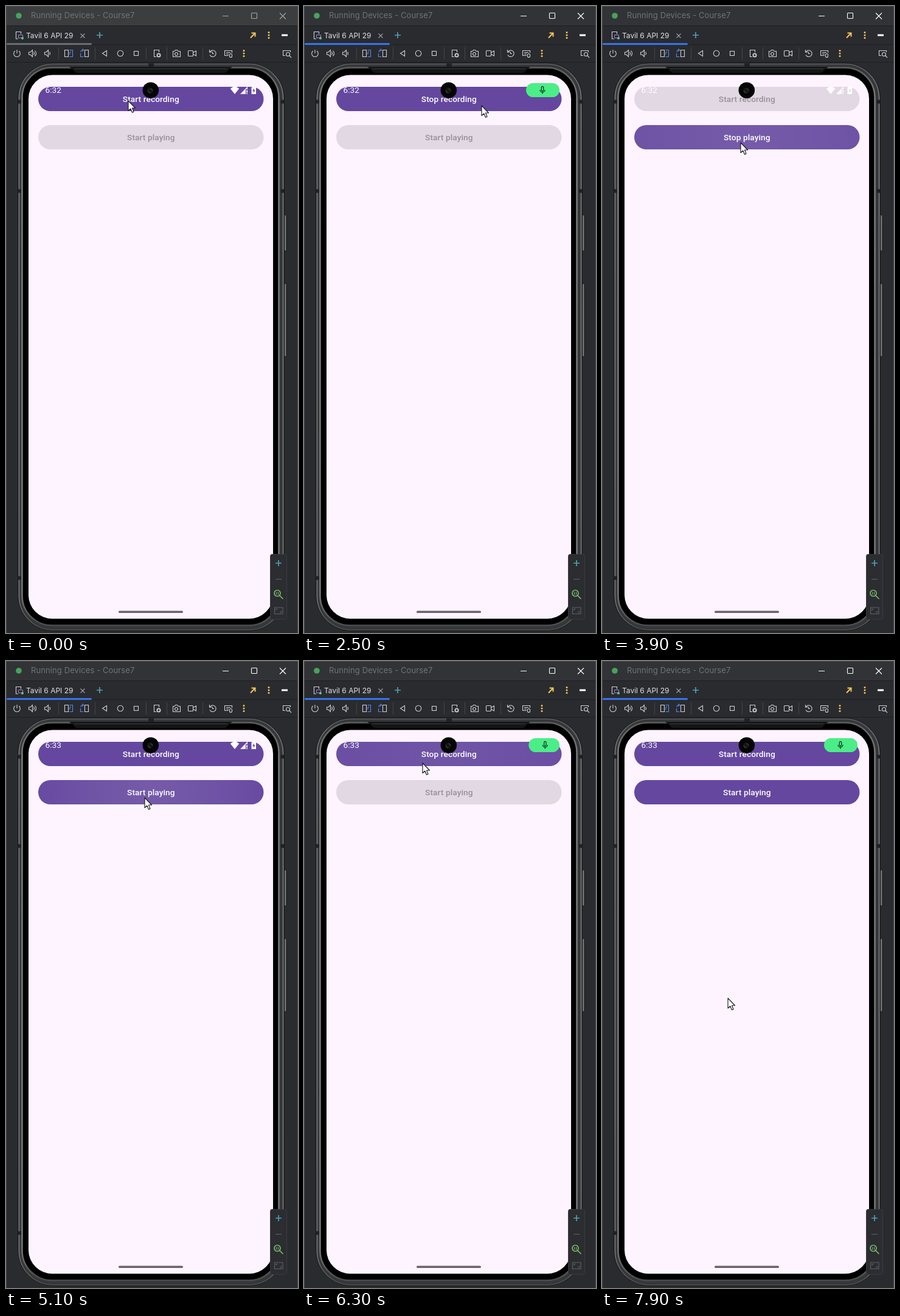
Animation, 480 px wide and 1032 px high, one loop 8 s. Source, as an HTML page:

```html
<!DOCTYPE html>
<html lang="en">
<head>
<meta charset="utf-8">
<title>Voice recorder on a running device</title>
<style>
  html, body { margin: 0; width: 100%; height: 100%; overflow: hidden; background: #2b2d30; }
  svg { display: block; width: 100%; height: 100%; }
  .ide { font: 12px Inter, sans-serif; fill: #dfe1e5; }
  .label { font: 500 13.66px Roboto, sans-serif; letter-spacing: .1px; text-anchor: middle; }
  .clock { font: 13.66px Roboto, sans-serif; fill: #fff; }
  .icons { fill: none; stroke: #ced0d6; stroke-width: 1.1; }
  .blue { stroke: #548af7; }
  .teal { stroke: #4f9fb5; stroke-width: 1.7; }
  .gray { stroke: #5d6067; }
  .yellow { stroke: #f2c55c; stroke-width: 2; }
  .dots { fill: #f2c55c; stroke: none; }
  .sep { stroke: #43454a; }
</style>
</head>
<body>
<svg viewBox="0 0 480 1032" preserveAspectRatio="none">
  <defs>
    <radialGradient id="glow">
      <stop offset="0" stop-color="#fff" stop-opacity=".11"/>
      <stop offset=".5" stop-color="#fff" stop-opacity=".06"/>
      <stop offset="1" stop-color="#fff" stop-opacity="0"/>
    </radialGradient>
    <linearGradient id="metal" x2="0" y2="1">
      <stop offset="0" stop-color="#5c5d5e"/>
      <stop offset=".06" stop-color="#7c7d7e"/>
      <stop offset=".94" stop-color="#77787a"/>
      <stop offset="1" stop-color="#4a4b4c"/>
    </linearGradient>
    <clipPath id="clip0"><rect x="53" y="133" width="370.500" height="40" rx="20"/></clipPath>
    <clipPath id="clip1"><rect x="53" y="196" width="370.500" height="40" rx="20"/></clipPath>
  </defs>

  <!-- window chrome -->
  <rect width="480" height="1032" fill="#2a2b2f"/>
  <rect id="titleBar" width="480" height="32"/>
  <path d="M0 32.500H480M0 63.500H480M0 92.500H480" stroke="#1e1f22"/>
  <path d="M.5 0V1032M479.500 0V1032M0 .5H480" stroke="#4b4d50"/>
  <circle cx="21" cy="16" r="4.800" fill="#46a35a"/>
  <text class="ide" x="41" y="20.300" style="font-size:13px;letter-spacing:.1px;fill:#717376">Running Devices - Course7</text>
  <g id="controls" fill="none" stroke-width="1.100">
    <path d="M356 16.500H366M450 11.500l10 10M460 11.500l-10 10"/>
    <rect x="403.500" y="11.500" width="9" height="9" rx="1"/>
  </g>
  <text class="ide" x="33" y="52.500">Tavil 6 API 29</text>
  <rect id="underline" x="1" y="61" width="140" height="3" rx="1.500"/>

  <g class="icons">
    <path d="M20 54H16.500V42.500H24.500V46"/><rect x="20.500" y="47.500" width="7" height="5" rx="1" stroke="#9b7bea"/>
    <circle cx="27" cy="53" r="2" fill="#5fd36b" stroke="none"/>
    <path d="M122.500 45.500l7 7M129.500 45.500l-7 7" stroke="#9da0a8"/>
    <path class="teal" d="M149 48H159M154 43V53"/>
    <path class="yellow" d="M402 52.500L409 45M403.500 44.500H409.500V50.500"/>
    <g class="dots"><circle cx="432" cy="43.500" r="1.500"/><circle cx="432" cy="48" r="1.500"/><circle cx="432" cy="52.500" r="1.500"/></g>
    <path d="M453 48H463" stroke="#fff" stroke-width="3"/>

    <path d="M18 72V78M14.800 74a5.300 5.300 0 1 0 6.400 0"/>
    <path id="speaker" d="M37.500 76H40L43.500 72.500V83.500L40 80H37.500ZM45.500 75.500q2 2.500 0 5"/>
    <path d="M47.500 73.500q4 4.500 0 9"/>
    <use href="#speaker" x="26"/>
    <path d="M96.500 72.500H102.500V83.500H96.500Z"/>
    <path class="blue" d="M104.500 72.500H109.500V83.500H104.500M107 75q-3 1-2 5"/>
    <path d="M129.500 72.500H135.500V83.500H129.500Z"/>
    <path class="blue" d="M123 76q0-4 4-3.500M125.500 70.500l2 2l-2 2M122.500 78V83.500H127.500"/>
    <path d="M165.500 73.500V82.500L158.500 78Z"/>
    <circle cx="188" cy="78" r="4.700"/>
    <rect x="210.500" y="74.500" width="7" height="7"/>
    <path d="M247 83.500H243.500V72.500H251.500V76"/><circle cx="251" cy="81" r="2.600" stroke-width="1.800"/>
    <path d="M274.500 74.500H277L278.500 72.500H281.500L283 74.500H286.500V83.500H274.500Z"/><circle cx="280" cy="79" r="2.500"/>
    <rect x="299.500" y="73.500" width="8" height="9" rx="1"/><path d="M308 76.500L312.500 74V82L308 79.500"/>
    <path d="M334.500 72V76H338.500M335 76a5.300 5.300 0 1 1 0 4.500M339.500 75.500V78.500H342"/>
    <path d="M366 81.500H359.500V73.500H371.500V77M362 76.500H369M362 79H366"/><rect x="367.500" y="78.500" width="4" height="6" rx="2"/>
    <g class="dots"><circle cx="391" cy="73.500" r="1.500"/><circle cx="391" cy="78" r="1.500"/><circle cx="391" cy="82.500" r="1.500"/></g>
    <path d="M459 81.500H455.500V73.500H467.500V76"/><circle cx="463.500" cy="79.500" r="3"/><path d="M465.700 81.700L469 85"/>
    <path class="sep" d="M86.500 68V88M146.500 68V88M230.500 68V88M264.500 68V88M323.500 68V88"/>
  </g>

  <!-- phone body -->
  <g fill="#737476" stroke="#17181a">
    <rect x="455.500" y="344" width="5.500" height="59" rx="1.500"/>
    <rect x="455.500" y="457" width="5.500" height="120" rx="1.500"/>
  </g>
  <rect x="19.500" y="94" width="438" height="934.500" rx="58" fill="#363738" stroke="#171819"/>
  <rect x="21.500" y="95.500" width="434" height="931.500" rx="56" fill="none" stroke="url(#metal)" stroke-width="1.500"/>
  <rect x="26.500" y="101.500" width="422" height="918" rx="49" fill="#000" stroke="url(#metal)" stroke-width="2.500"/>
  <path d="M104 100H372L364 107Q363 110 358 110H118Q113 110 112 107Z" fill="#151617"/>
  <path d="M112 103.500H364" stroke="#3b3c3d"/>
  <path d="M234 97.500H243M20 157.500H25M20 304.500H25M20 941.500H25M452 157.500H457M452 304.500H457" stroke="#202122" stroke-width="6"/>
  <rect x="37" y="113.500" width="402" height="895" rx="39" fill="#fef4ff"/>
  <rect x="185" y="995.500" width="106" height="3.500" rx="1.700" fill="#6b606d"/>

  <!-- app -->
  <rect id="button0" x="53" y="133" width="370.500" height="40" rx="20"/>
  <rect id="button1" x="53" y="196" width="370.500" height="40" rx="20"/>
  <g clip-path="url(#clip0)"><circle id="ripple0" cx="238" cy="153" fill="url(#glow)"/></g>
  <g clip-path="url(#clip1)"><circle id="ripple1" cx="238" cy="216" fill="url(#glow)"/></g>
  <text id="label0" class="label" x="238.300" y="158.200"></text>
  <text id="label1" class="label" x="238.300" y="221.200"></text>

  <!-- status bar -->
  <text id="clock" class="clock" x="64.500" y="143.300"></text>
  <g id="status" fill="#fff">
    <path d="M376 145L368.800 136Q376 129 383.200 136Z"/>
    <path d="M385 145L397 132.500V137H394V145Z" opacity=".9"/><path d="M395.200 138.500H397V142.500H395.200ZM395.200 143.500H397V145H395.200Z"/>
    <path fill-rule="evenodd" d="M403.500 133.500H405.500V132H409V133.500H411V145H403.500ZM407.800 135.500L405 139.800H407V143L409.700 138.600H407.800Z"/>
  </g>
  <g id="pill">
    <rect id="pillBody" y="127" height="23" rx="11.500" fill="#4bee86"/>
    <g id="mic" fill="none" stroke="#123a20" stroke-width="1.300">
      <rect x="-1.700" y="132.500" width="3.400" height="7.500" rx="1.700"/>
      <path d="M-4 138a4 4 0 0 0 8 0M0 142V144.500"/>
    </g>
  </g>
  <circle cx="237.800" cy="138.700" r="13.300" fill="#050505"/>
  <circle cx="237" cy="139" r="5" fill="#151515"/>
  <path d="M233.500 139a4 4 0 0 0 4 4M237.500 136.500a2.500 2.500 0 0 1 3 3" fill="none" stroke="#4b4b4b"/>

  <!-- zoom panel -->
  <rect x="434.500" y="902.500" width="27" height="107" rx="3" fill="#2b2d31" stroke="#393b40"/>
  <g class="icons">
    <path class="teal" d="M443 917H453M448 912V922"/>
    <path class="gray" d="M443 943.500H453"/>
    <g stroke="#77b767" stroke-width="1.700"><circle cx="446" cy="966.500" r="5"/><path d="M449.800 970.300L455.500 976"/></g>
    <path d="M444.500 964.500V969M447.500 964.500V969" stroke="#77b767"/>
    <path class="gray" d="M441.500 990H455V1000.500H441.500ZM444 995V992.500H446.500M452.500 995.500V998H450"/>
  </g>

  <path id="cursor" d="M0 0V16.500L3.800 13L6.400 19.300L9 18.200L6.500 12H11.500Z" fill="#fff" stroke="#16161a" stroke-width="1.100" stroke-linejoin="round"/>
</svg>
<script>
const LOOP = 8000, TICK = 100;

// [time, x, y]
const cursorPath = [
  [0, 201, 156], [100, 201, 156], [600, 217, 165], [1200, 217, 165], [2300, 292, 164],
  [2700, 292, 164], [3300, 228, 222], [3500, 228, 225], [5200, 228, 225],
  [5800, 195, 168], [7100, 195, 168], [7800, 207, 555], [8000, 207, 555]
];
// [button, start, end]
const presses = [
  [0, 500, 1050], [0, 2600, 3100], [1, 3500, 4200],
  [1, 4950, 5600], [0, 5800, 6500], [0, 6850, 7400]
];
const recordings = [[1000, 2700], [6000, 7000]];
const playbacks = [[3500, 5100]];
const micPills = [[1100, 3400], [6100, 9000]];

const ui = Object.fromEntries([...document.querySelectorAll('[id]')].map(el => [el.id, el]));
const clamp = v => Math.max(0, Math.min(1, v));
const during = (spans, t) => spans.find(([from, to]) => t >= from && t < to);
const set = (el, attrs) => {
  for (const name in attrs) el.setAttribute(name, attrs[name]);
};

function cursorAt(t) {
  const i = cursorPath.findIndex(([time]) => time > t);
  const [t0, x0, y0] = cursorPath[i - 1], [t1, x1, y1] = cursorPath[i];
  const p = (t - t0) / (t1 - t0), k = p * p * (3 - 2 * p);
  return [x0 + (x1 - x0) * k, y0 + (y1 - y0) * k];
}

function drawButton(index, t, text, enabled) {
  set(ui['button' + index], { fill: enabled ? '#65479f' : '#e1d8e3' });
  const label = ui['label' + index];
  label.textContent = text;
  set(label, { fill: enabled ? '#fff' : '#979099' });

  const press = presses.find(([b, from, to]) => b === index && t >= from && t < to);
  const [, from, to] = press || [0, 0, 0];
  set(ui['ripple' + index], {
    r: 60 + 330 * clamp((t - from) / 300),
    opacity: press && enabled ? clamp((to - t) / 300) : 0
  });
}

function drawPill(t) {
  const span = during(micPills, t);
  set(ui.pill, { visibility: span ? 'visible' : 'hidden' });
  set(ui.status, { visibility: span ? 'hidden' : 'visible' });
  if (!span) return;
  const grow = 1 - (1 - clamp((t - span[0]) / 350)) ** 3;
  const width = 55 * grow * clamp((span[1] - t) / 200);
  set(ui.pillBody, { x: 420 - width, width });
  set(ui.mic, { transform: `translate(${447 - width})`, opacity: width > 40 ? 1 : 0 });
}

function render(now) {
  const t = Math.floor(now % LOOP / TICK) * TICK;
  const recording = during(recordings, t), playing = during(playbacks, t);
  const active = t >= 100;

  set(ui.titleBar, { fill: active ? '#313337' : '#3b3d3f' });
  set(ui.controls, { stroke: active ? '#fff' : '#a5a6a8' });
  set(ui.underline, { fill: active ? '#3574f0' : '#6a6d73' });
  drawButton(0, t, recording ? 'Stop recording' : 'Start recording', !playing);
  drawButton(1, t, playing ? 'Stop playing' : 'Start playing', t >= 2700 && !recording);
  ui.clock.textContent = t < 5100 ? '6:32' : '6:33';
  drawPill(t);
  set(ui.cursor, { transform: `translate(${cursorAt(t)})` });
}

const start = performance.now();
function frame() {
  render(performance.now() - start);
  requestAnimationFrame(frame);
}
frame();
</script>
</body>
</html>
```
